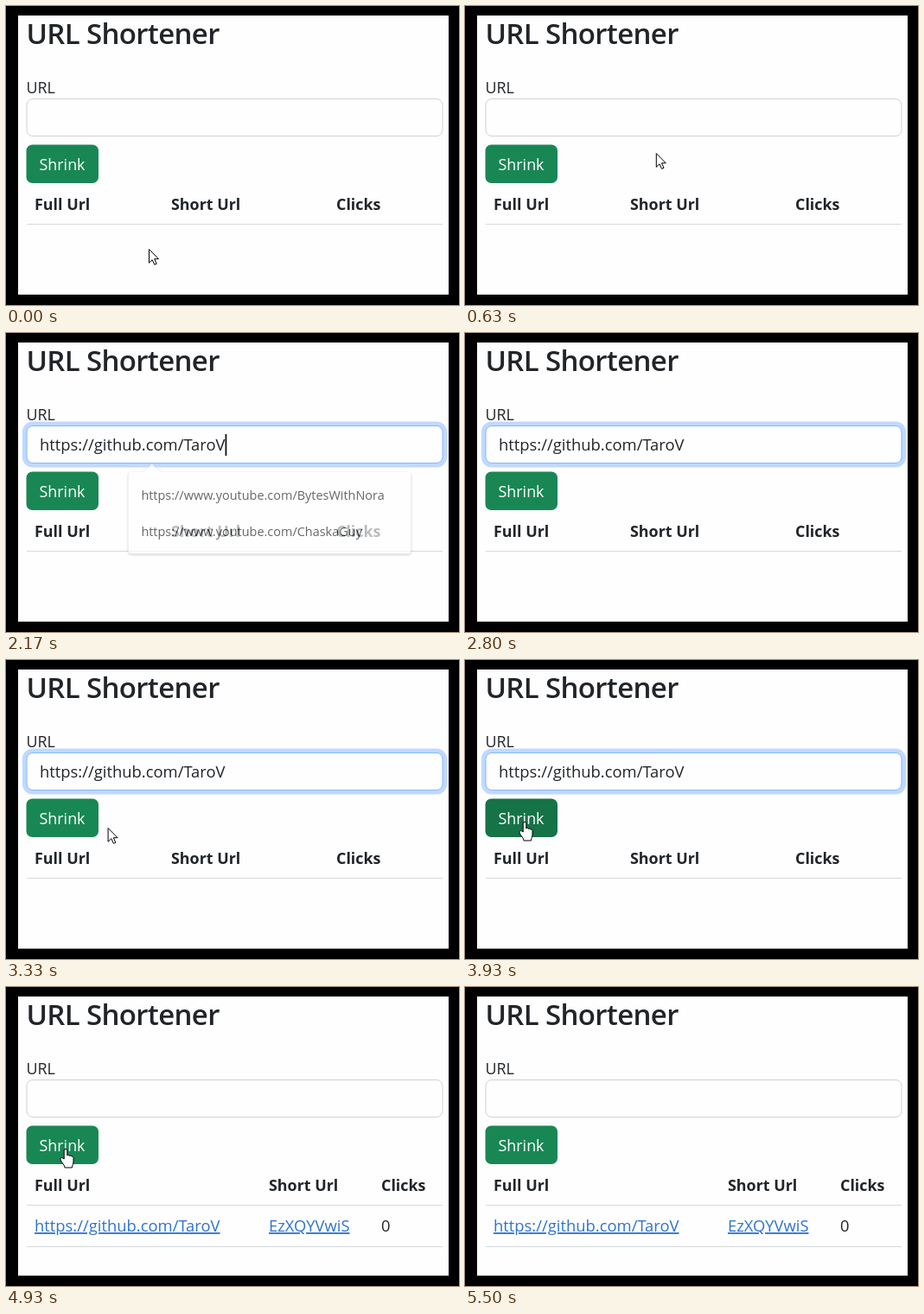
Animation of 524x346 px, one loop 6460 ms. Source, as an HTML page:

```html
<!DOCTYPE html>
<html lang="en">
<head>
<meta charset="utf-8">
<title>URL Shortener</title>
<style>
  html, body { margin: 0; width: 100%; height: 100%; overflow: hidden; background: #000; }
  svg { display: block; width: 524px; height: 346px; }
  text { font: 18.4px "Open Sans", "Noto Sans", sans-serif; fill: #212529; white-space: pre; }
  .title { font-size: 33px; font-weight: 600; letter-spacing: -.65px; }
  .label { font-size: 17.9px; }
  .head { font-size: 17.9px; font-weight: 700; }
  .btn { font-size: 17.9px; fill: #fff; text-anchor: middle; }
  .hint { font-size: 14.6px; }
  .link { fill: #2f74cf; text-decoration: underline; }
  .rule { fill: #d6dadd; }
  #popup { transform-origin: 305px 208px; }
  #bubble { fill: #fff; filter: drop-shadow(0 1px 1.5px rgba(0, 0, 0, .32)); }
  #cursor path { fill: #fff; stroke: #000; stroke-width: 1; stroke-linejoin: round; }
  #cursor #ibeam { fill: none; stroke: #cdcdcd; }
</style>
</head>
<body>
<svg viewBox="0 0 524 346">
  <clipPath id="page"><rect x="14" y="11" width="498" height="323"/></clipPath>
  <g clip-path="url(#page)">
    <rect x="14" y="11" width="498" height="323" fill="#fefefe"/>
    <text class="title" x="23.5" y="44">URL Shortener</text>
    <text class="label" x="23.5" y="100.5">URL</text>

    <rect id="ring" fill="#0d6efd"/>
    <rect id="field" x="24" y="107.5" width="481" height="43" rx="7" fill="#fefefe"/>
    <text id="value" x="39" y="136">https://github.com/TaroV</text>
    <rect id="caret" y="117" width="1.8" height="25" fill="#111"/>

    <rect id="btnRing" x="19" y="156" width="92.5" height="53.5" rx="11" fill="#3c996e"/>
    <rect id="btn" x="23.5" y="160.5" width="83.5" height="44.5" rx="7"/>
    <text class="btn" x="65" y="190">Shrink</text>

    <text class="head" x="33" y="236">Full Url</text>
    <text class="head" id="headShort" y="236">Short Url</text>
    <text class="head" id="headClicks" y="236">Clicks</text>
    <rect class="rule" x="24" y="252" width="481" height="1"/>
    <g id="row">
      <text class="link" x="33" y="283">https://github.com/TaroV</text>
      <text class="link" x="304" y="283">EzXQYVwiS</text>
      <text x="434" y="283">0</text>
      <rect class="rule" x="24" y="300" width="481" height="1"/>
    </g>

    <g id="popup">
      <path id="bubble" d="M144 160.5H157L167.5 151L178 160.5H466a4 4 0 0 1 4 4V252a4 4 0 0 1-4 4H144a4 4 0 0 1-4-4V164.500a4 4 0 0 1 4-4z"/>
      <text class="hint" x="155" y="193">https://www.youtube.com/BytesWithNora</text>
      <text class="hint" x="155" y="235">https://www.youtube.com/ChaskaGuy</text>
    </g>

    <g id="cursor">
      <path id="arrow" d="M.5 .5V16.300L4.200 12.700L6.800 18.300L9.200 17.300L6.700 11.700H11.500z"/>
      <path id="ibeam" d="M-2.500 -8H-.5L0 -7.500L.5 -8H2.500M0 -7.500V7.500M-2.500 8H-.5L0 7.500L.5 8H2.500"/>
      <path id="hand" d="M-1.800 12V2a1.800 1.800 0 0 1 3.600 0V8a1.500 1.500 0 0 1 2.700 .5a1.500 1.500 0 0 1 2.500 .8a1.300 1.300 0 0 1 2 1.200V15c0 3-1.500 4-1.500 7H-1c0-3-3.500-5.500-5-9c-.7-2 1.500-3 2.700-2z"/>
    </g>
  </g>
</svg>
<script>
const LOOP = 6460;
const POPUP = [1090, 1190, 2100, 2330];
const TYPED = 2100, SUBMIT = 4300;
const CARET = [[1070, 1600], [2100, 2630]];
const SHOWN = [[0, 2100], [2830, 5480]];

// time, x, y of the pointer's hot spot
const PATH = [
  [130, 165, 281], [260, 169, 269], [430, 190, 226], [620, 220, 172], [770, 231, 146],
  [800, 231, 144], [1000, 228, 127],
  [2770, 228, 127], [2920, 206, 145], [3120, 156, 188], [3400, 105, 196], [3540, 69, 187],
  [4960, 69, 187], [5130, 82, 216], [5300, 100, 270], [5470, 118, 335]
];

const el = {};
document.querySelectorAll('[id]').forEach(e => el[e.id] = e);

const set = (e, attrs) => { for (const k in attrs) e.setAttribute(k, attrs[k]); };
const show = (e, on) => { e.style.display = on ? '' : 'none'; };
const within = (t, spans) => spans.some(([a, b]) => t >= a && t < b);
const line = (t, a, b) => Math.min(1, Math.max(0, (t - a) / (b - a)));
const ease = (t, a, b) => { const k = line(t, a, b); return k * k * (3 - 2 * k); };
const mix = (a, b, k) => `rgb(${a.map((v, i) => Math.round(v + (b[i] - v) * k))})`;

function pointer(t) {
  const next = PATH.findIndex(p => p[0] > t);
  if (next === 0) return PATH[0].slice(1);
  if (next < 0) return PATH[PATH.length - 1].slice(1);
  const [a, b] = [PATH[next - 1], PATH[next]];
  const k = line(t, a[0], b[0]);
  return [a[1] + (b[1] - a[1]) * k, a[2] + (b[2] - a[2]) * k];
}

function shape(x, y, done) {
  if (y > 107 && y < 151) return 'ibeam';
  if (x < 107 && y > 160 && y < 205) return 'hand';
  if (done && y > 268 && y < 290) return 'hand';
  return 'arrow';
}

function draw(t) {
  const done = t >= SUBMIT;
  const typed = t >= TYPED && !done;

  const focus = ease(t, 1130, 1270) - ease(t, 3940, 4130);
  const w = 4.6 * focus;
  set(el.ring, {
    x: 23.5 - w, y: 107 - w, width: 482 + 2 * w, height: 44 + 2 * w,
    rx: 7.5 + w, opacity: .26 * focus
  });
  set(el.field, { stroke: mix([206, 210, 218], [134, 183, 254], focus) });

  show(el.value, typed);
  show(el.caret, within(t, CARET));
  set(el.caret, { x: typed ? 39 + el.value.getComputedTextLength() : 38.6 });

  const hover = done
    ? ease(t, 4930, 5060) - ease(t, 5080, 5230)
    : ease(t, 3400, 3560);
  set(el.btn, { fill: mix([25, 135, 84], [21, 115, 71], hover) });
  set(el.btnRing, { opacity: done ? 0 : .5 * ease(t, 3940, 4110) });

  set(el.headShort, { x: done ? 304 : 191 });
  set(el.headClicks, { x: done ? 434 : 382 });
  show(el.row, done);

  const open = line(t, POPUP[0], POPUP[1]) - line(t, POPUP[2], POPUP[3]);
  show(el.popup, open > 0);
  el.popup.style.opacity = open;
  el.popup.style.transform = `scale(${.97 + .03 * open})`;

  const [x, y] = pointer(t);
  const kind = shape(x, y, done);
  show(el.cursor, within(t, SHOWN));
  set(el.cursor, { transform: `translate(${x.toFixed(1)} ${y.toFixed(1)})` });
  for (const id of ['arrow', 'ibeam', 'hand']) show(el[id], id === kind);
}

const start = performance.now();
function tick() {
  draw((performance.now() - start) % LOOP);
  requestAnimationFrame(tick);
}
tick();
</script>
</body>
</html>
```
